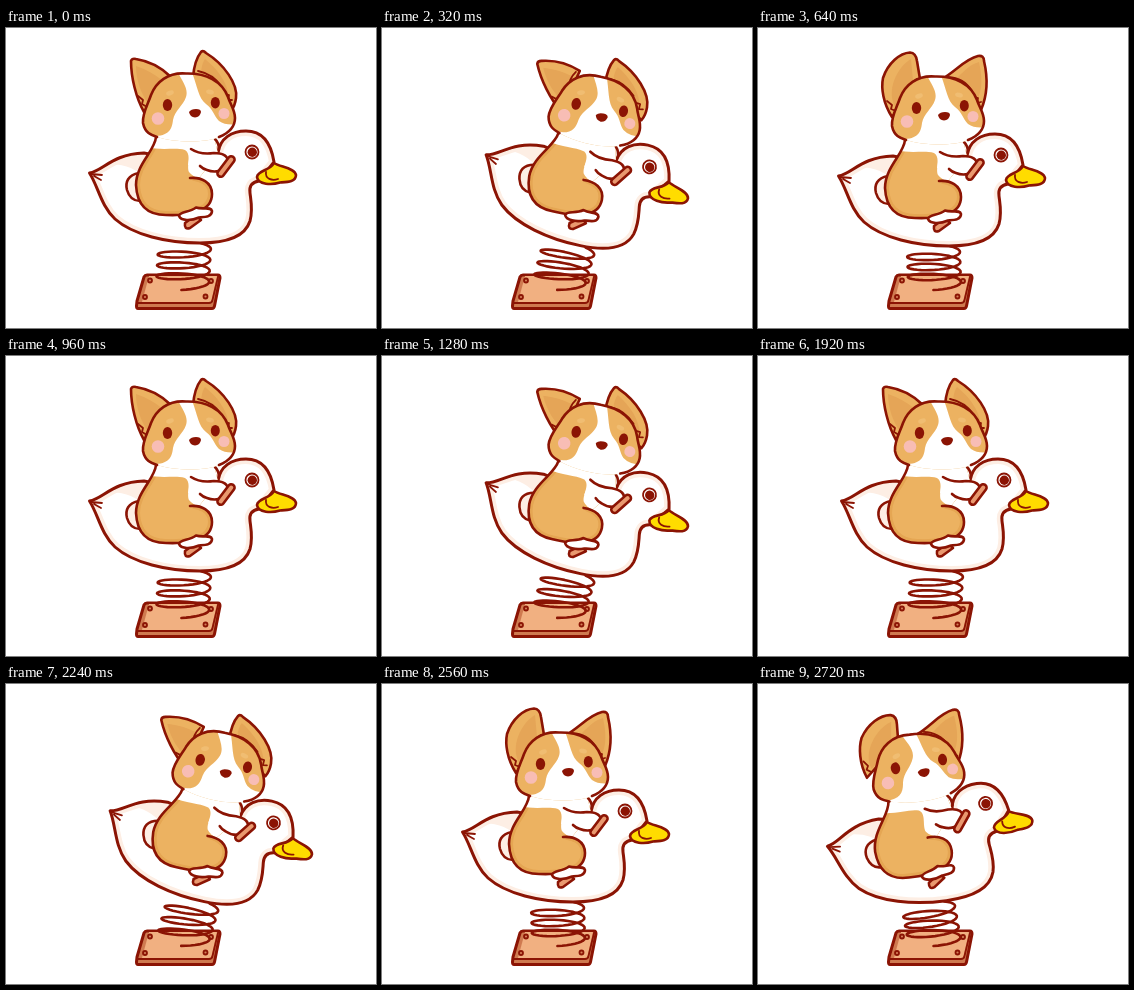
These frames come from a looping animation (370x300 px, 2880 ms). An HTML page:

```html
<!DOCTYPE html>
<html lang="en">
<head>
<meta charset="utf-8">
<title>Spring rider</title>
<style>
  html, body { margin: 0; width: 100%; height: 100%; overflow: hidden; background: #fff; }
  svg { display: block; width: 370px; height: 300px; }
  .line { stroke: #8b1404; stroke-width: 2.6; stroke-linecap: round; stroke-linejoin: round; }
  .thin { stroke-width: 1.8; }
  .bold { stroke-width: 3; }
  .none { fill: none; }
  .white { fill: #fff; }
  .cream { fill: #fdeee4; }
  .tan { fill: #ecb261; }
  .inner { fill: #e5a557; }
  .wood { fill: #e9996f; }
  .dark { fill: #8b1404; }
  .blush { fill: #f8bdb5; }
  .brow { fill: #f0bd72; }
</style>
</head>
<body>
<svg viewBox="0 0 370 300">
  <defs>
    <path id="duckShape" d="M83.500 145 C97 143 106 126 138 125 L190 135 L212 125 C214 110 226 103 240 103 C256 103 265 115 268 134 L253 153 C246 154 243 158 244 165 C245 173 247 182 244 193 C239 209 221 215 194 215 C161 215 127 207 109 191 C95 178 92 158 83.500 145 Z"/>
    <path id="headShape" d="M180 45.500 C162 44 150 54 145 67 C142 76 136 86 137 95 C139 105 145 107 151 109 C170 115 200 115 213 109 C223 105 229 99 229 90 C229 82 225 78 222 69 C216 53 200 45 180 45.500 Z"/>
    <path id="bodyShape" d="M150 109 C149 123 130 136 130 157 C131 177 141 187 160 187 C184 188 206 184 206 166 C206 157 201 152 193 150 L212 126 L208 109 Z"/>
    <clipPath id="duckClip"><use href="#duckShape"/></clipPath>
    <clipPath id="headClip"><use href="#headShape"/></clipPath>
    <clipPath id="bodyClip"><use href="#bodyShape"/></clipPath>
  </defs>

  <g id="base">
    <path class="line bold" fill="#cf7a50" d="M141 247 L212 247 Q214 247 214 250 L208.500 278 Q208 280.500 206 280.500 L132 280.500 Q130.500 280.500 130.500 278 L131 273 L138 249 Q139 247 141 247 Z"/>
    <path fill="#f1b081" d="M143 248 L211 248 L205 274 L136 274 Z"/>
    <path class="line thin none" d="M131 275 H203 Q206 275 206.500 272 L212 249"/>
    <g class="line thin" fill="#d5815a">
      <circle cx="144" cy="252.500" r="2"/><circle cx="205" cy="253" r="2"/>
      <circle cx="139" cy="269" r="2"/><circle cx="199.500" cy="268.500" r="2"/>
    </g>
  </g>

  <path id="spring" class="line none"/>

  <g id="rider">
    <use href="#duckShape" class="white"/>
    <use href="#duckShape" clip-path="url(#duckClip)" fill="none" stroke="#fdeee4" stroke-width="10"/>
    <path class="cream" d="M105 136 Q117 126 138 126 V150 Q128 137 105 136 Z"/>
    <use href="#duckShape" class="line bold none"/>
    <path class="line thin none" d="M85 146 L96 147 M88 148 L95 152"/>
    <path class="line" fill="#ffdc00" d="M268 135 C274 139 289 140 290 147 C290 154 281 154 274 154.500 C266 157 252 157 251 149 C252 142 264 143 268 135 Z"/>
    <path class="line thin none" d="M260 144 C259 151 266 153 272 151"/>
    <circle class="line thin white" cx="246" cy="124" r="6.500"/>
    <circle class="dark" cx="246.300" cy="124.300" r="4.700"/>

    <path class="line cream" d="M133 145 C122 147 119 154 121 162 C123 169 128 173 134 173"/>
    <use href="#bodyShape" class="tan"/>
    <use href="#bodyShape" clip-path="url(#bodyClip)" fill="none" stroke="#e5a653" stroke-width="8"/>
    <path class="white" clip-path="url(#bodyClip)" d="M140 119 C157 123 169 119 179 122 C186 126 180 138 183 144 Q187 149 193 150 L220 150 V100 H140 Z"/>
    <path class="line none" d="M150 109 C149 123 130 136 130 157 C131 177 141 187 160 187 C184 188 206 184 206 166 C206 154 195 149 184 150"/>
    <path class="line none" d="M209 111 Q213 115 213 121"/>

    <path class="line wood" d="M179 195 L190 187 L195 192 L184 200 Q178 202 179 195 Z"/>
    <path class="line white" d="M190 179.500 C197 182 205 178 206 183 C206 189 199 189 193 189.500 C185 193 175 193 173 188 C174 183 183 185 190 179.500 Z"/>
    <path class="white" d="M185 121 Q194 127 211 125 Q223 127 222 134 C220 144 208 146 201 142 Q193 138 182 137 Z"/>
    <path class="line none" d="M185 121 Q194 127 208 125 Q222 125 222 134 C220 144 208 145 201 142 Q197 141 194 138"/>
    <g transform="translate(220 138.500) rotate(-53)">
      <rect class="line wood" x="-12" y="-3.300" width="24" height="6.600" rx="3.200"/>
    </g>

    <g class="back">
      <g class="ear left">
        <path class="line tan" d="M138 84 C130 70 125 49 125 33 Q126 30 130 31 C143 33 155 39 165 49 Z"/>
        <path class="inner" d="M143 77 C135 66 130 52 130 38 Q145 43 157 53 Z"/>
        <path class="line thin none" d="M132 68 L137 72 L136 76 L141 79 M151 62 Q153 54 161 49"/>
      </g>
      <g class="ear right">
        <path class="line tan" d="M187 49 C188 38 191 29 195 24 Q197 22 200 25 C218 36 232 56 230 70 Q229 78 225 83 Z"/>
        <path class="inner" d="M195 47 C195 39 197 34 199 31 C211 41 222 54 223 71 Z"/>
        <path class="line thin none" d="M192 43 Q207 46 216 59 M219 66 L223 67 L222 72 L226 72"/>
      </g>
    </g>
    <g class="up">
      <g class="ear left">
        <path class="line tan" d="M137 86 C128 72 126 57 128 47 C133 32 145 22 155 21.500 Q161 22 162 30 L165 48 Z"/>
        <path class="inner" d="M141 77 C130 61 142 36 156 28 L158 50 Z"/>
        <path class="line thin none" d="M132 70 L137 74 L136 78 L141 80 M147 66 Q152 54 162 48"/>
      </g>
      <g class="ear right">
        <path class="line tan" d="M187 48 C201 40 210 28 223 25 Q229 24 229 30 C233 47 232 65 226 79 Z"/>
        <path class="inner" d="M202 47 C210 39 216 33 224 31 C227 45 228 58 222 69 Z"/>
        <path class="line thin none" d="M193 46 Q209 47 217 60 M219 66 L223 67 L222 72 L226 71"/>
      </g>
    </g>

    <use href="#headShape" class="tan"/>
    <path class="white" clip-path="url(#headClip)" d="M171 42 C175 52 183 60 180 69 C177 78 169 82 167 92 C166 102 162 108 148 108 V120 H232 V96 Q220 98 213 93 C208 88 207 81 200 76 C192 70 191 56 185 42 Z"/>
    <path class="line none" d="M151 109 C145 107 139 105 137 95 C136 86 142 76 145 67 C150 54 162 44 180 45.500 C200 45 216 53 222 69 C225 78 229 82 229 90 C229 99 223 105 213 109"/>
    <ellipse class="brow" cx="164" cy="65" rx="4" ry="2.300" transform="rotate(-20 164 65)"/>
    <ellipse class="brow" cx="204" cy="64" rx="4" ry="2.300" transform="rotate(15 204 64)"/>
    <circle class="blush" cx="152" cy="90.500" r="6.300"/>
    <circle class="blush" cx="218" cy="85.500" r="5.500"/>
    <ellipse class="dark" cx="161.500" cy="77" rx="4.700" ry="6"/>
    <ellipse class="dark" cx="209.300" cy="74.700" rx="4.500" ry="5.800"/>
    <path class="dark" d="M183 84 Q185 81 190 81 Q195 81 195 84 Q194 89 189 89.500 Q184 89 183 84 Z"/>
  </g>
</svg>

<script>
  const STEP = 160;
  const PIVOT = [186.5, 146.5];

  // Pivot position, tilt, ear shape and ear swings
  const poses = [
    { x: 186.5, y: 146.5, tilt: 0, ears: "back", left: 0, right: 0 },
    { x: 193.5, y: 148, tilt: 4.3, ears: "back", left: -8, right: -3 },
    { x: 204.7, y: 149, tilt: 11.6, ears: "back", left: -24, right: -9 },
    { x: 191.2, y: 149.3, tilt: 4.3, ears: "up", left: 0, right: 0 },
    { x: 183.5, y: 149.5, tilt: 0, ears: "up", left: 0, right: 0 },
    { x: 171.7, y: 149.8, tilt: -7.8, ears: "up", left: 13, right: 6 }
  ];

  const find = s => document.querySelector(s);
  const all = s => document.querySelectorAll(s);
  const rider = find("#rider");
  const spring = find("#spring");

  function springPath({ x, y, tilt }) {
    const a = tilt * Math.PI / 180;
    const topX = x - 8 - 50 * Math.sin(a);
    const topY = y + 71 - 8 * Math.sin(a);
    const turns = 3.4, n = 120;
    let d = "";
    for (let i = 0; i <= n; i++) {
      const k = i / n;
      const t = k * turns * 2 * Math.PI - 0.9;
      const b = a * (1 - 0.8 * k);
      const u = 26.5 * Math.cos(t), v = 5.5 * Math.sin(t);
      const px = topX + (176.5 - topX) * k + u * Math.cos(b) - v * Math.sin(b);
      const py = topY + 2 + (254.5 - topY) * k + u * Math.sin(b) + v * Math.cos(b);
      d += (i ? "L" : "M") + px.toFixed(1) + " " + py.toFixed(1);
    }
    return d;
  }

  function show(p) {
    rider.setAttribute("transform",
      `translate(${p.x} ${p.y}) rotate(${p.tilt}) translate(${-PIVOT[0]} ${-PIVOT[1]})`);
    for (const name of ["back", "up"]) {
      find("." + name).style.display = name === p.ears ? "" : "none";
    }
    all(".left").forEach(e => e.setAttribute("transform", `rotate(${p.left} 150 62)`));
    all(".right").forEach(e => e.setAttribute("transform", `rotate(${p.right} 207 58)`));
    spring.setAttribute("d", springPath(p));
  }

  const start = performance.now();
  let shown = -1;
  function tick() {
    const i = Math.floor((performance.now() - start) / STEP) % poses.length;
    if (i !== shown) show(poses[shown = i]);
    requestAnimationFrame(tick);
  }
  tick();
</script>
</body>
</html>
```
